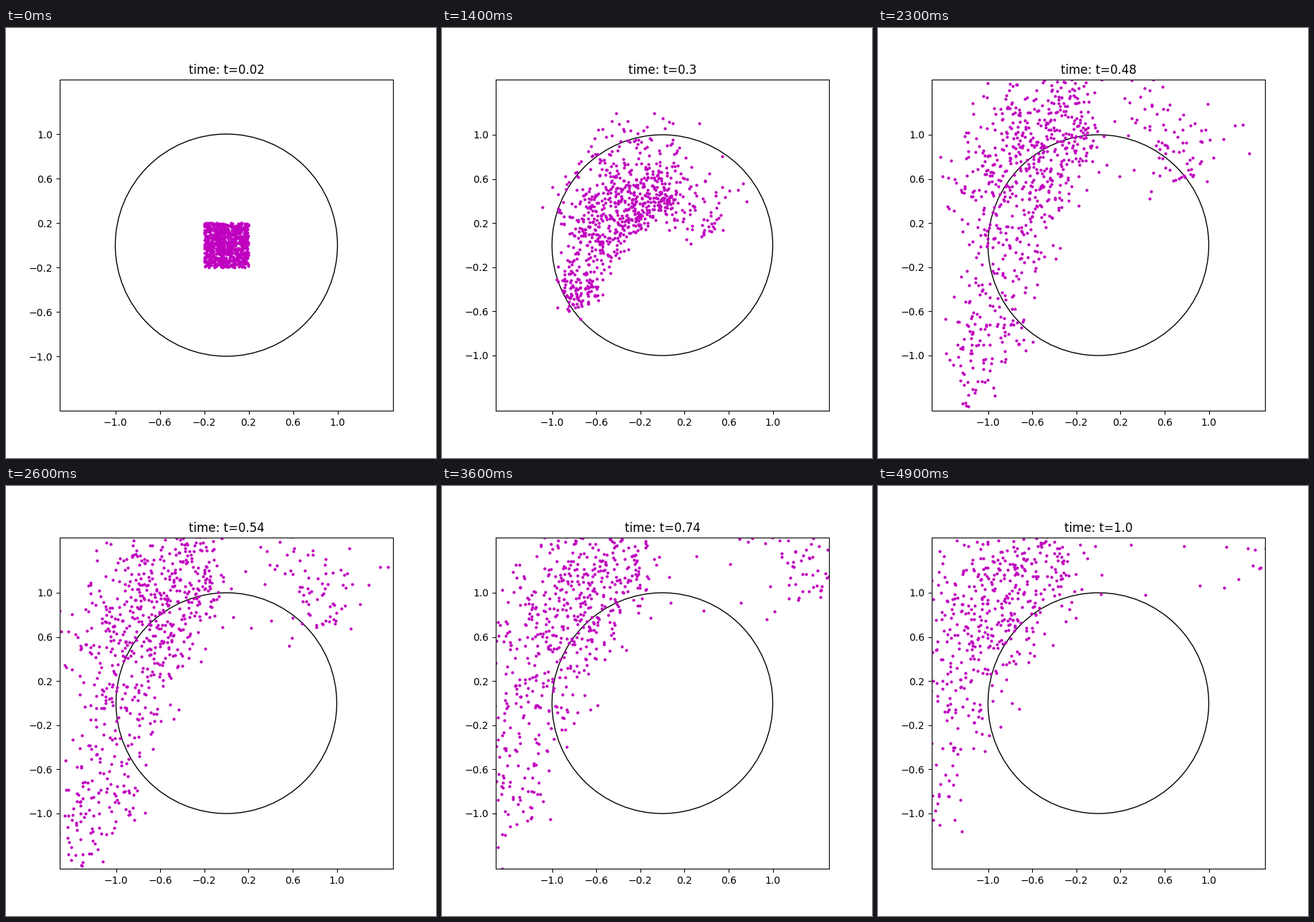
Write a matplotlib script that moves like this. It is 600x600 px and loops after 5000 ms.

```python
import numpy as np
import matplotlib.pyplot as plt
from matplotlib.animation import FuncAnimation

FRAMES, INTERVAL = 50, 100
PARTICLES = 820
RATIO = 462 / 465          # axes height / width in pixels
WIDEN_FRAME = 14           # the view switches from fitted y to fitted x here
KEYS = [0, 9, 19, 23, 30, 42, 49]

# Inner and outer edge of the arch-shaped cloud, from lower left to right
YOUNG_ARCH = (
    [(-.60, .00), (-.57, .05), (-.42, .13), (-.15, .27), (.15, .25), (.12, .10), (.40, .00)],
    [(-.60, .35), (-.65, .35), (-.55, .60), (-.70, .37), (-.25, 1.1), (.10, .90), (.55, .65)],
)
WIDE_ARCH = (
    [(-.50, -1.05), (-.65, -.75), (-.30, -.30), (-.20, .03), (.00, .45), (.10, .25), (.38, -.05)],
    [(-1.2, -1.45), (-1.15, -.85), (-1.0, -.35), (-1.3, .15), (-.50, 1.1), (.12, 1.15), (1.0, .52)],
)
# Drift of the wide arch per key time: shift of the right limb, then
# offset and gradient in y of the left limb's x and y shifts
DRIFT = [
    ((.31, .45), (-.10, .00), (.30, .25)),
    ((.62, .72), (-.30, .20), (.30, .50)),
    ((1.18, .98), (-.43, .32), (.45, .40)),
    ((1.20, 1.20), (-.55, .38), (.38, .50)),
]

rng = np.random.default_rng(4)


def place(arch, along, across):
    """Map strip coordinates to the area between the two edges of an arch."""
    inner, outer = (
        np.column_stack([np.interp(along, range(7), c) for c in zip(*edge)])
        for edge in arch)
    return inner + (outer - inner) * across[:, None]


def drifted(points, right, left_x, left_y):
    x, y = points.T
    limb = (1 + np.tanh((x - .1) / .03))[:, None] / 2
    left = np.column_stack([a + b * y for a, b in (left_x, left_y)])
    return points + limb * np.array(right) + (1 - limb) * left


def starting_square(targets):
    """Uniform square whose particles keep the ordering of their targets."""
    def ranked(points):
        column = np.argsort(np.argsort(points[:, 0])) // 40
        return np.lexsort((points[:, 1], column))

    square = rng.uniform(-.2, .2, targets.shape)
    start = np.empty_like(square)
    start[ranked(targets)] = square[ranked(square)]
    return start


along = np.where(rng.random(PARTICLES) < .6,
                 rng.uniform(0, 6, PARTICLES), rng.normal(3.5, .4, PARTICLES))
across = 1.15 * rng.beta(1.5, 1.6, PARTICLES)
scatter = rng.normal(0, 1, (PARTICLES, 2))

young = place(YOUNG_ARCH, along, across ** 2) + .025 * scatter
wide = place(WIDE_ARCH, along, across) + .07 * scatter
poses = [starting_square(young), young, wide]
poses += [drifted(wide, *d) + .035 * n * scatter for n, d in enumerate(DRIFT, 1)]


def cloud(i):
    k = min(np.searchsorted(KEYS, i, side="right") - 1, len(KEYS) - 2)
    mix = (i - KEYS[k]) / (KEYS[k + 1] - KEYS[k])
    return (1 - mix) * poses[k] + mix * poses[k + 1]


fig, ax = plt.subplots(figsize=(6, 6), dpi=100)
ax.add_patch(plt.Circle((0, 0), 1, fill=False, color="k", lw=1))
dots, = ax.plot([], [], "m.", ms=4)
ticks = [-1, -.6, -.2, .2, .6, 1]
ax.set_xticks(ticks)
ax.set_yticks(ticks)
title = ax.set_title("")


def update(i):
    half_x = 1.5 if i < WIDEN_FRAME else 1.5 / RATIO
    ax.set_xlim(-half_x, half_x)
    ax.set_ylim(-half_x * RATIO, half_x * RATIO)
    dots.set_data(*cloud(i).T)
    title.set_text(f"time: t={round(.02 * (i + 1), 2)}")
    return dots, title


anim = FuncAnimation(fig, update, frames=FRAMES, interval=INTERVAL,
                     repeat=True, repeat_delay=0)
plt.show()
```
